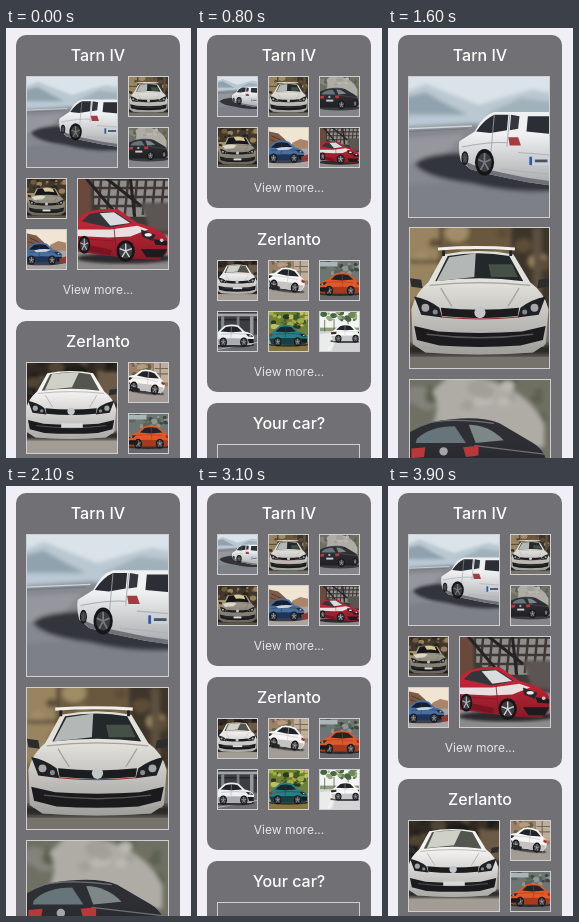
Write an HTML page that moves like this. It is 185 px wide and 430 px high and loops after 4 s.

```html
<!DOCTYPE html>
<html lang="en">
<head>
<meta charset="utf-8">
<title>Car gallery</title>
<style>
/* --m: mosaic amount, --l: list amount; both zero gives the plain grid */
@property --m { syntax: '<number>'; inherits: true; initial-value: 1; }
@property --l { syntax: '<number>'; inherits: true; initial-value: 0; }

html, body { margin: 0; width: 100%; height: 100%; overflow: hidden; }
body { background: #f0eff5; }
#stage {
  position: relative; width: 185px; height: 430px; overflow: hidden;
  background: #f0eff5; color: #fff; text-align: center;
  font-family: Inter, Roboto, sans-serif;
  animation: layout 4s ease-in-out infinite;
}
@keyframes layout {
  0%, 7.95%       { --m: 1; --l: 0; }
  15.95%, 32.625% { --m: 0; --l: 0; }
  40.625%, 57.55% { --m: 0; --l: 1; }
  65.55%, 81.075% { --m: 0; --l: 0; }
  89.075%, 100%   { --m: 1; --l: 0; }
}
.card {
  position: absolute; left: 10px; width: 164px;
  --h: calc(173 + 102 * var(--m) + 816 * var(--l));
  top: calc((7 + var(--i) * (var(--h) + 11)) * 1px);
  height: calc(var(--h) * 1px);
  border-radius: 10px; background: #717074; overflow: hidden;
}
h2 { position: absolute; top: 10px; width: 100%; margin: 0; font: 500 16px/20px Inter, Roboto, sans-serif; }
.more { position: absolute; bottom: 12px; width: 100%; font-size: 12px; line-height: 16px; color: #e6e6e8; }
.photo {
  position: absolute; box-sizing: border-box; overflow: hidden;
  border: 1px solid #cfcfd1;
  --x: calc(51 * var(--gx));
  --y: calc(51 * var(--gy));
  --s: calc(41 + 51 * var(--big, 0) * var(--m) + 102 * var(--l));
  left: calc((10 + var(--x) * (1 - var(--l)) + 51 * var(--dx, 0) * var(--m)) * 1px);
  top: calc((41 + var(--y) * (1 - var(--l)) + 51 * var(--dy, 0) * var(--m) + 153 * var(--n) * var(--l)) * 1px);
  width: calc(var(--s) * 1px);
  height: calc(var(--s) * 1px);
}
.photo svg { display: block; width: 100%; height: 100%; }
.p0 { --n: 0; --gx: 0; --gy: 0; --big: 1; }
.p1 { --n: 1; --gx: 1; --gy: 0; --dx: 1; }
.p2 { --n: 2; --gx: 2; --gy: 0; --dy: 1; }
.p3 { --n: 3; --gx: 0; --gy: 1; --dy: 1; }
.p4 { --n: 4; --gx: 1; --gy: 1; --dx: -1; --dy: 2; }
.p5 { --n: 5; --gx: 2; --gy: 1; --dx: -1; --dy: 1; --big: 1; }
.slot { position: absolute; left: 10px; top: 41px; width: 143px; height: 143px; box-sizing: border-box; border: 1px solid #cfcfd1; }
.defs { position: absolute; width: 0; height: 0; }
</style>
</head>
<body>
<svg class="defs">
  <filter id="soft"><feGaussianBlur stdDeviation="1.6"/></filter>
  <filter id="fine"><feGaussianBlur stdDeviation=".35"/></filter>
  <linearGradient id="sheen" x2="0" y2="1">
    <stop offset=".3" stop-color="#000" stop-opacity="0"/>
    <stop offset="1" stop-color="#000" stop-opacity=".3"/>
  </linearGradient>
</svg>
<div id="stage"></div>
<script>
const shape = (d, fill) => `<path d="${d}" fill="${fill}"/>`;
const box = (x, y, w, h, fill) => `<rect x="${x}" y="${y}" width="${w}" height="${h}" fill="${fill}"/>`;
const oval = (x, y, rx, ry, fill) => `<ellipse cx="${x}" cy="${y}" rx="${rx}" ry="${ry}" fill="${fill}"/>`;
const line = (d, color, w) => `<path d="${d}" fill="none" stroke="${color}" stroke-width="${w}"/>`;
const place = (t, art) => `<g transform="${t}">${art}</g>`;
const soft = (...art) => `<g filter="url(#soft)">${art.join('')}</g>`;
const base = fill => box(-5, -5, 110, 110, fill);
const ground = (y, fill) => box(-5, y, 110, 105 - y, fill);
const lit = (d, fill) => shape(d, fill) + shape(d, 'url(#sheen)');

function wheel(x, y, r, k = 0.8, rim = '#b4b5b9') {
  let spokes = '';
  for (let a = 0; a < 5; a++) {
    const t = a * Math.PI * 0.4 - Math.PI / 2;
    spokes += `M${x} ${y}L${x + Math.cos(t) * r * k * 0.7} ${y + Math.sin(t) * r * 0.7}`;
  }
  return oval(x, y, r * k, r, '#161618') + oval(x, y, r * k * 0.72, r * 0.72, '#3b3c40') + line(spokes, rim, r * 0.13);
}

// Foliage or wall texture from seeded random blobs
function blobs(seed, n, x, y, w, h, colors) {
  let out = '';
  const rnd = () => (seed = seed * 16807 % 2147483647) / 2147483647;
  for (let i = 0; i < n; i++) {
    const r = 3 + rnd() * 6;
    out += oval(x + rnd() * w, y + rnd() * h, r, r * 0.8, colors[i % colors.length]);
  }
  return out;
}

// Car seen from the side, nose to the right
const side = (paint, shade, glass = '#202428') =>
  soft(oval(50, 79, 48, 5, 'rgba(20,20,24,.7)')) +
  shape('M4 68Q2 54 13 48L28 34Q46 28 61 34L75 47Q92 50 97 60L96 74L90 78H10Z', paint) +
  shape('M5 65Q45 61 96 65L95 75L88 78H10Z', shade) +
  shape('M19 47L31 37Q45 33 58 37L69 47L45 49Z', glass) +
  line('M44 35L43 62M20 54Q55 50 85 54', shade, 1.2) +
  shape('M78 53Q90 52 95 60L83 59Z', '#26282c') + oval(88, 57, 2.5, 1.2, '#f4f6f8') +
  shape('M82 65H96V74H85Z', '#191a1c') +
  shape('M4 55L12 52V58L5 60Z', '#a5282a') +
  wheel(25, 72, 11) + wheel(73, 72, 11);

// Car seen from the front
const front = (paint, shade, glass) =>
  soft(box(-2, 83, 104, 8, 'rgba(12,12,14,.75)')) +
  lit('M24 19Q49 14 74 19L86 39Q96 46 99 58L97 83L88 89Q50 92 11 89L2 83L1 58Q4 46 13 39Z', paint) +
  shape('M27 20Q49 16 71 20L81 38Q50 34 18 38Z', glass) +
  line('M14 41Q50 37 86 41M22 43Q26 50 30 56M78 43Q74 50 70 56', shade, 0.9) +
  shape('M3 49Q13 51 21 57L23 64L8 62ZM97 49Q87 51 79 57L77 64L92 62Z', '#1f2023') +
  oval(11, 57, 2.8, 2.8, '#a3a6a9') + oval(89, 57, 2.8, 2.8, '#a3a6a9') +
  oval(18, 60, 1.8, 1.8, '#85888b') + oval(82, 60, 1.8, 1.8, '#85888b') +
  shape('M22 57Q50 60 78 57L77 63Q50 66 23 63Z', '#1b1c1e') +
  shape('M3 70L20 74Q50 76 80 74L97 70L95 80L79 84Q50 86 21 84L5 80Z', '#1b1b1d') +
  line('M12 76Q50 81 88 76', '#55565a', 1) +
  line('M4 84Q50 93 96 84', shade, 1) +
  shape('M0 36L8 37L9 43L1 42ZM100 36L92 37L91 43L99 42Z', '#2c2c2d') +
  oval(50, 60.5, 4, 4, '#c3c6ca');

const lake = () =>
  base('#dae3e9') +
  soft(shape('M-5 12L12 5L32 13L50 20L70 14L88 9L105 12V34H-5Z', '#bac8d1'),
    shape('M-5 15L12 11L28 20L44 28H-5Z', '#8fa2ad'), shape('M56 26L80 15L105 18V30H50Z', '#a0b1ba'),
    box(-5, 27, 110, 9, '#b9c9d4'), shape('M-5 36L45 33L105 37V105H-5Z', '#85888f'),
    shape('M-5 44L40 41L20 60L-5 62Z', '#94979d'), shape('M-5 78Q45 70 105 86V105H-5Z', '#7d8087'),
    shape('M4 62Q10 55 37 54L58 66L105 76V82Q70 83 44 76Q10 72 4 62Z', '#32343a')) +
  line('M-2 37L45 35', '#cfd5da', 1) + line('M-2 39L42 37', '#747a81', 0.8) +
  lit('M36 46L47 39Q53 27 61 25L100 25L105 26V78L84 75L60 70L44 66L37 60Q35 52 36 46Z', '#eef0f2') +
  shape('M37 59L46 63L60 67L84 72L105 75V78L84 75L60 70L44 66Z', '#6e7178') +
  shape('M48 39Q54 30 61 27L71 27L70 38L58 40Z', '#2a2d33') + shape('M73 27L79 28L78 37L72 38Z', '#34383e') +
  shape('M85 28L105 28V41L84 39Z', '#2b2f35') + line('M61 27L58 60M72 27L70 50M38 50Q58 46 70 47', '#9da1a7', 0.6) +
  shape('M71 43L78 43L80 49L72 49Z', '#a43b40') + line('M78 54L105 56M66 66L105 70', '#aeb2b8', 0.8) +
  box(86, 57, 16, 6, '#c9d2dc') + box(86, 57, 2, 6, '#3658a0') + line('M90 60H99', '#4c525a', 2) +
  wheel(40, 58, 5, 0.5, '#55565a') + wheel(54, 61, 9.5, 0.72, '#77797e');

const wall = () =>
  base('#7c6a4c') +
  soft(box(-5, -5, 26, 58, '#98855f'), box(25, -5, 46, 22, '#69583c'), box(73, -5, 32, 62, '#3d342a'),
    blobs(5, 14, 0, 0, 100, 40, ['#a08c66', '#5d4d37', '#867351']), box(88, 0, 6, 50, '#5e5140'),
    line('M22 -5V48M73 -5V50M0 24H22', '#40352a', 2), ground(68, '#76736c')) +
  front('#e2e1dc', '#a3a29d', '#23292a') +
  shape('M28 21L47 18L46 35L19 38Z', 'rgba(215,220,218,.8)') + shape('M56 26H73L77 35H58Z', '#455047') +
  line('M20 15Q48 13 75 15', '#efefeb', 2.2) + line('M24 16V20M72 16V20', '#222', 2) + line('M22 63.6Q50 66.5 78 63.6', '#97302d', 0.7);

const street = () =>
  base('#6f7062') +
  soft(blobs(7, 24, 0, 0, 100, 30, ['#5c6150', '#84837a', '#575c4c']),
    shape('M30 -5Q82 0 96 32V48H6Q26 22 16 8Z', '#aeaca5'), blobs(11, 9, 30, 4, 50, 20, ['#bab8b2', '#a2a099']),
    ground(58, '#858588'), oval(50, 79, 54, 7, '#3a3b3f')) +
  lit('M-5 40Q12 29 30 28Q52 26 64 31L88 45Q100 52 99 72L92 78H-5Z', '#2e2f34') +
  shape('M5 42Q14 33 32 33L40 45H4Z', '#66757a') + shape('M42 32Q56 32 67 43L47 45Z', '#7d8788') +
  line('M2 33Q26 26 60 31M46 47L96 53', '#6d7076', 0.9) +
  shape('M1 49L11 48L10 55L1 56ZM38 48L49 47L49 54L40 55Z', '#b9383a') +
  oval(24, 51, 3, 3, '#a2a6aa') + box(16, 58, 18, 5, '#c9cdd0') + wheel(55, 71, 11) + wheel(90, 68, 9, 0.6);

const alley = () =>
  base('#41372a') +
  soft(blobs(19, 22, 0, 0, 100, 34, ['#6b5a3b', '#2c251d', '#94805a']), ground(55, '#5f564a'), box(-5, 36, 24, 24, '#a58f63')) +
  place('translate(2 6) scale(.96)', front('#a09a8c', '#5c574c', '#17171a')) +
  shape('M40 24Q52 21 66 25L70 34Q56 31 46 33Z', '#d9c894') + shape('M12 46Q30 40 48 44L40 52L18 54Z', '#dcd6c4') + box(40, 78, 20, 5, '#ddd');

const sunset = () =>
  base('#f0e4d3') +
  soft(shape('M-5 8L24 14L44 32V55H-5Z', '#7d5c47'), shape('M60 38L80 28L105 34V60H55Z', '#a98468'), ground(53, '#a9a4a1')) +
  line('M6 20L32 32M4 30L34 41', '#4f3a30', 2.5) +
  place('translate(-16 -2) scale(1.1)', side('#4a6f9f', '#1f3558', '#151f30')) +
  shape('M18 52Q40 47 62 50L50 56L24 57Z', '#c6d3e2') + shape('M82 74L105 66V84L86 87Z', '#8d3a35');

const depot = () => {
  let panes = '';
  for (let i = 0; i < 9; i++) panes += `M${16 + i * 10} -2L${12 + i * 10} 40`;
  return base('#3f3a38') + shape('M18 2H105V42H45L18 30Z', '#8f8e8b') +
    line(panes + 'M12 10H105M12 20H105M12 30H105', '#3e3735', 2.8) +
    soft(box(-5, -5, 20, 66, '#6b4a3e'), shape('M70 26H105V58H80Z', '#5b5552'), ground(62, '#8d8a8a')) +
    line('M8 -2L42 38M58 -2L63 42M30 -2L70 30', '#262324', 3.4) +
    soft(oval(52, 88, 54, 6, '#2c2a2d')) +
    lit('M-5 48L8 38Q28 31 45 34L66 49Q91 54 99 66V82L90 90L55 88L-5 80Z', '#c02536') +
    shape('M4 47L13 39Q30 35 42 37L60 49L35 54Z', '#34343b') + shape('M24 38L40 37L58 49L36 52Z', '#d9dbde') +
    shape('M-5 56L36 56L66 52L78 56L58 64L34 65L-5 63Z', '#e9dfe0') + shape('M-5 70L38 79L36 85L-5 77Z', '#7b1421') +
    line('M0 66L40 69M40 54L42 76', '#831826', 0.9) +
    shape('M70 56L86 62L83 69L71 64Z', '#28282b') + oval(78, 62, 4, 2, '#eef1f3') +
    shape('M84 67L99 69V74L86 73ZM70 78L99 78L94 87L76 87Z', '#1c1b1e') + oval(93, 68, 2, 2, '#c8cacd') +
    wheel(7, 73, 10, 0.65) + wheel(53, 80, 12, 0.85, '#d0d1d4');
};

const grove = () =>
  base('#2f2820') +
  soft(blobs(31, 32, 0, -4, 100, 40, ['#1f1a15', '#4f4434', '#3a3127']), box(78, 10, 27, 34, '#6a5a47'), ground(50, '#8a847d'), ground(84, '#a29c95')) +
  place('translate(-2 -8) scale(1.02)', front('#f4f3f1', '#aeadab', '#55554f')) +
  shape('M28 12L58 10L50 27L20 30Z', '#cfd0c6') + box(38, 67, 24, 5, '#d7d8d8');

const brick = () =>
  base('#9c8068') +
  soft(blobs(43, 18, 0, 0, 58, 34, ['#6c5f45', '#b59b80', '#57644a']), box(64, -5, 41, 55, '#bcae9a'), ground(60, '#a39c96')) +
  line('M66 14H105M66 28H105M80 -5V48', '#78685a', 3) +
  place('translate(106 -12) rotate(8) scale(-1.14 1.18)', side('#f6f5f3', '#c6c4c2')) +
  shape('M6 60L28 66L26 76L7 69Z', '#232427');

const woods = () =>
  base('#6d7673') +
  soft(blobs(59, 28, 0, 0, 100, 34, ['#3e4740', '#8d9692', '#59635c']), box(-5, 2, 50, 12, '#aab5b8'), ground(56, '#68686b')) +
  place('translate(108 -6) scale(-1.16 1.14)', side('#e0592a', '#a53a1c')) + shape('M2 68H24L22 78H6Z', '#1b1b1d');

const garage = () =>
  base('#3b3d42') +
  soft(box(-5, 4, 110, 7, '#a2a5a9'), box(-5, 18, 110, 4, '#232529'), box(8, 11, 8, 48, '#84868c'),
    box(48, 11, 7, 48, '#777a80'), box(82, 11, 9, 48, '#94979c'), ground(58, '#6b6e74')) +
  line('M0 96L100 78', '#bec0c5', 2) +
  place('translate(-14 -2) scale(1.1)', side('#eceef1', '#a9acb3'));

const meadow = () =>
  base('#6f8038') +
  soft(blobs(71, 36, 0, 0, 100, 42, ['#3c5a2c', '#a1ac45', '#26381f', '#c2bd62']), ground(60, '#b19c55'), shape('M-5 88L105 76V105H-5Z', '#877542')) +
  place('translate(-4 0) scale(1.06)', side('#287f85', '#173f48', '#17262a'));

const avenue = () =>
  base('#f1f4f3') +
  soft(blobs(83, 24, 0, 0, 100, 24, ['#6d8958', '#95aa78', '#486544']), box(-5, 40, 110, 10, '#8b9c79'), ground(50, '#d2d4d5'),
    shape('M-5 58L50 50L28 105H-5Z', '#eaebeb')) +
  line('M12 20V50M36 18V48M72 18V44', '#5b594b', 2) + line('M48 50L20 100', '#fff', 2) +
  place('translate(24 2) scale(.92)', side('#fafafa', '#c5c9cc')) + shape('M28 53L42 50V56L30 58Z', '#2b2d31');

const photo = (draw, n) =>
  `<div class="photo p${n}"><svg viewBox="0 0 100 100"><g filter="url(#fine)">${draw()}</g></svg></div>`;
const gallery = (title, i, scenes) =>
  `<section class="card" style="--i:${i}"><h2>${title}</h2>${scenes.map(photo).join('')}<div class="more">View more...</div></section>`;

document.getElementById('stage').innerHTML =
  gallery('Tarn IV', 0, [lake, wall, street, alley, sunset, depot]) +
  gallery('Zerlanto', 1, [grove, brick, woods, garage, meadow, avenue]) +
  '<section class="card" style="--i:2"><h2>Your car?</h2><div class="slot"></div></section>';
</script>
</body>
</html>
```
